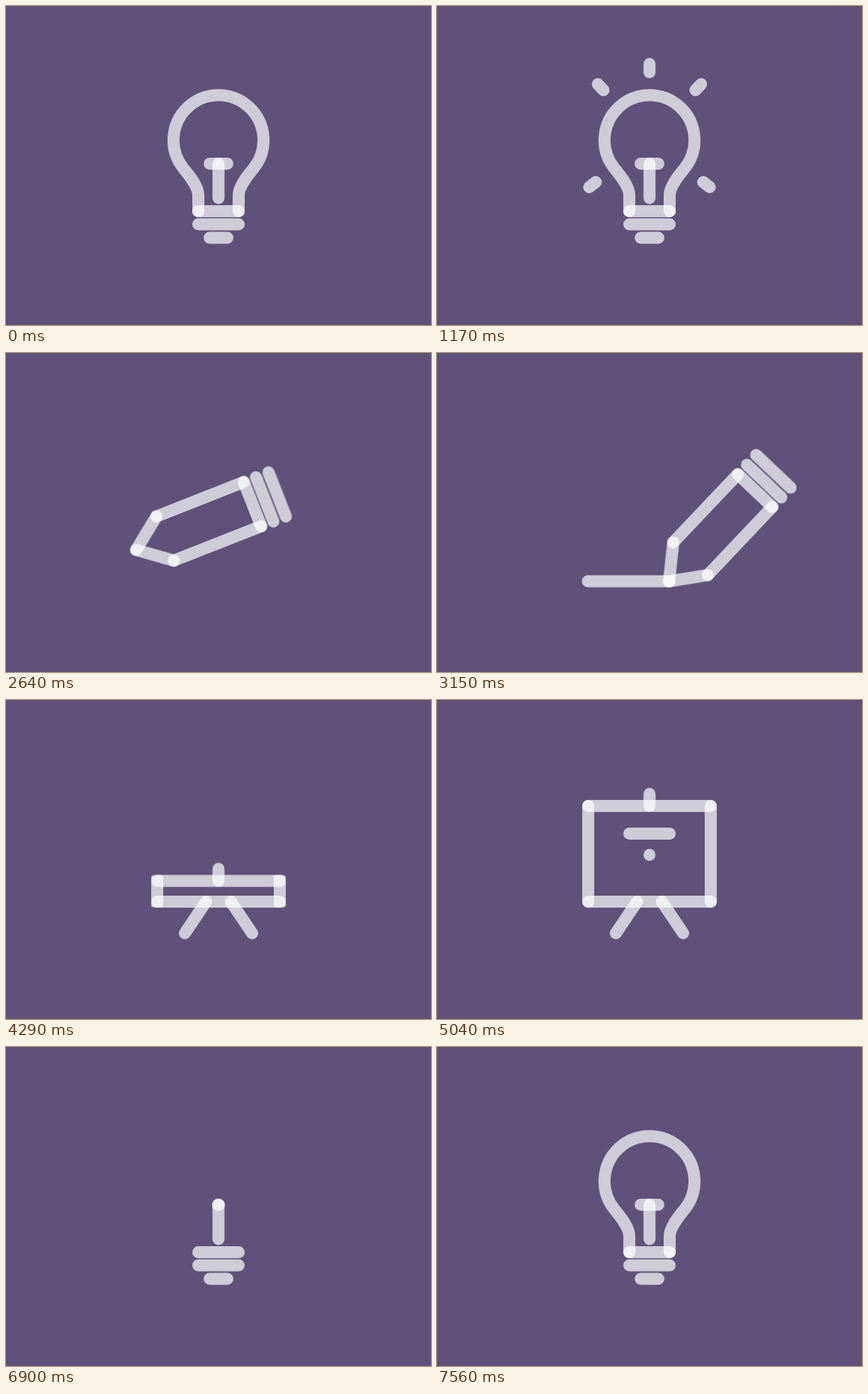
An HTML page that plays this animation: 600x450 px, repeating every 7890 ms.

```html
<!DOCTYPE html>
<html lang="en">
<head>
<meta charset="utf-8">
<title>Idea, sketch, present</title>
<style>
  html, body { margin: 0; height: 100%; overflow: hidden; background: #5f5179; }
  svg { display: block; width: 600px; height: 450px; }
  path { fill: none; stroke: #fff; stroke-opacity: .7; stroke-width: 17; stroke-linecap: round; stroke-linejoin: round; }
  #pencil { transform-origin: 298px 235px; }
  #board { transform-origin: 300px 217px; }
  .edge { transform-origin: 0 298px; }
  .post { transform-origin: 0 293px; }
</style>
</head>
<body>
<svg viewBox="0 0 600 450">
  <g id="rays"></g>
  <path id="glass" d="M271.5 289.5V267C271.5 254 258.5 239 250.5 229A63.5 63.5 0 1 1 349.5 229C341.5 239 328.5 254 328.5 267V289.5"/>
  <path id="stem"/>
  <path id="cross"/>
  <g id="pencil">
    <path class="edge" d="M266.5 289.5V157"/>
    <path class="edge" d="M333.5 289.5V157"/>
    <g id="tip">
      <path d="M266.5 157L300 113"/>
      <path d="M333.5 157L300 113"/>
    </g>
    <path class="bar"/>
    <path class="bar"/>
    <path class="bar"/>
  </g>
  <g id="board">
    <path id="line"/>
    <path class="leg"/>
    <path class="leg"/>
    <path class="post" d="M213.5 284.5V149.5"/>
    <path class="post" d="M386.5 284.5V149.5"/>
    <g id="top">
      <path d="M213.5 149.5H386.5"/>
      <path id="pin"/>
    </g>
  </g>
</svg>
<script>
const LOOP = 7890;
const SINE = 'cubic-bezier(.37,0,.63,1)';
const IN = 'cubic-bezier(.32,0,.67,0)';
const OUT = 'cubic-bezier(.33,1,.68,1)';

const $ = id => document.getElementById(id);
const all = selector => [...document.querySelectorAll(selector)];
const seg = (x1, y1, x2, y2) => `path("M${x1} ${y1}L${x2} ${y2}")`;
const bar = (half, y) => seg(300 - half, y, 300 + half, y);

// Each step is [start ms, end ms, value, easing]; values hold in between.
function tween(el, prop, first, ...steps) {
  const frames = [{ offset: 0, [prop]: first }];
  let value = first;
  for (const [start, end, next, easing = SINE] of steps) {
    frames.push({ offset: start / LOOP, [prop]: value, easing },
                { offset: end / LOOP, [prop]: next });
    value = next;
  }
  frames.push({ offset: 1, [prop]: value });
  el.animate(frames, { duration: LOOP, iterations: Infinity });
}

const show = (el, from, to) => tween(el, 'opacity', 0, [from, from, 1], [to, to, 0]);

// Light rays
for (let i = -3; i <= 3; i++) {
  const ray = document.createElementNS('http://www.w3.org/2000/svg', 'path');
  $('rays').append(ray);
  const side = Math.abs(i) === 2;
  const angle = (i * 42.6 - 90) * Math.PI / 180;
  const at = r => [300 + r * Math.cos(angle), 189.5 + r * Math.sin(angle)];
  const reach = r => seg(...at(96), ...at(r));
  const start = side ? 310 : i ? 360 : 420;
  const [back, gone] = side ? [800, 1110] : [990, 1290];
  tween(ray, 'd', reach(96),
    [start, start + 360, reach(side ? 114 : 111), OUT],
    [back, gone, reach(96), IN]);
  tween(ray, 'opacity', 0, [start, start + 60, 1], [gone - 80, gone, 0]);
}

// Bulb
tween($('glass'), 'transform', 'translate(0px,0px)',
  [1500, 1770, 'translate(0px,-300px)', IN],
  [7170, 7560, 'translate(0px,0px)', OUT]);
const stem = y => seg(300, 271, 300, y);
tween($('stem'), 'd', stem(222.5), [1740, 1860, stem(271)], [6660, 6870, stem(222.5)]);
tween($('stem'), 'opacity', 1, [1860, 1860, 0], [6660, 6660, 1]);
tween($('cross'), 'd', bar(12.5, 222.5), [1620, 1740, bar(0, 222.5)], [6870, 7080, bar(12.5, 222.5)]);
tween($('cross'), 'opacity', 1, [1740, 1740, 0], [6870, 6870, 1]);

// Three bars: bulb base, pencil end, lines of text, bulb base again
const bars = [
  { base: 28.5, y: 289.5, text: 28.5, drop: 6120 },
  { base: 28.5, y: 308, text: 48.5, drop: 6050 },
  { base: 12.5, y: 327, text: 48.5, drop: 6000 }
];
all('.bar').forEach((el, i) => {
  const { base, y, text, drop } = bars[i];
  const row = 188.5 + 30 * i;
  const write = 4800 + 240 * i;
  tween(el, 'd', bar(base, y),
    [1740, 1890, bar(33.5, y)],
    [3600, 3600, bar(0, row)],
    [write, write + 240, bar(text, row)],
    [5820, 5990, bar(28.5, row)],
    [drop, drop + 220, bar(28.5, y + 35)],
    [drop + 220, drop + 360, bar(28.5, y)],
    [6480, 6660, bar(base, y)]);
  tween(el, 'opacity', 1, [3600, 3600, 0], [write, write, 1]);
});

// Pencil
const pose = (x, turn) => `translate(${x}px,0px) rotate(${turn}deg)`;
tween($('pencil'), 'transform', pose(0, 0),
  [2340, 2760, pose(0, -136.5)],
  [2970, 3270, pose(174, -136.5)],
  [3480, 3600, pose(404, -136.5), IN],
  [3600, 3600, pose(0, 0)]);
for (const edge of all('.edge')) {
  tween(edge, 'transform', 'scale(1,.114)', [1860, 2100, 'scale(1,1)']);
  tween(edge, 'opacity', 0, [1860, 2050, 1, 'linear'], [3600, 3600, 0]);
}
tween($('tip'), 'transform', 'translate(0px,132px)', [1860, 2100, 'translate(0px,0px)']);
show($('tip'), 1860, 3600);

// Board
show($('board'), 2975, 6090);
tween($('board'), 'transform', 'scale(1)',
  [5670, 5880, 'scale(1.18)'],
  [5880, 6090, 'scale(0)', IN]);
tween($('line'), 'd', seg(213, 322, 213, 322),
  [2970, 3270, seg(213, 322, 387, 322)],
  [3780, 3990, seg(213.5, 284.5, 386.5, 284.5)]);
all('.leg').forEach((leg, i) => {
  const dir = i ? 1 : -1;
  const foot = k => seg(300 + 17.5 * dir, 284.5, 300 + (17.5 + 30 * k) * dir, 284.5 + 44.5 * k);
  tween(leg, 'd', foot(0), [3990, 4110, foot(1.2)], [4110, 4200, foot(1)]);
  show(leg, 3990, 6090);
});
for (const post of all('.post')) {
  tween(post, 'transform', 'scale(1,.112)', [4170, 4560, 'scale(1,1)']);
  show(post, 4170, 6090);
}
tween($('top'), 'transform', 'translate(0px,135px)', [4170, 4560, 'translate(0px,0px)']);
show($('top'), 4170, 6090);
const pin = y => seg(300, 149.5, 300, y);
tween($('pin'), 'd', pin(149.5), [4170, 4270, pin(132.5)]);
</script>
</body>
</html>
```
